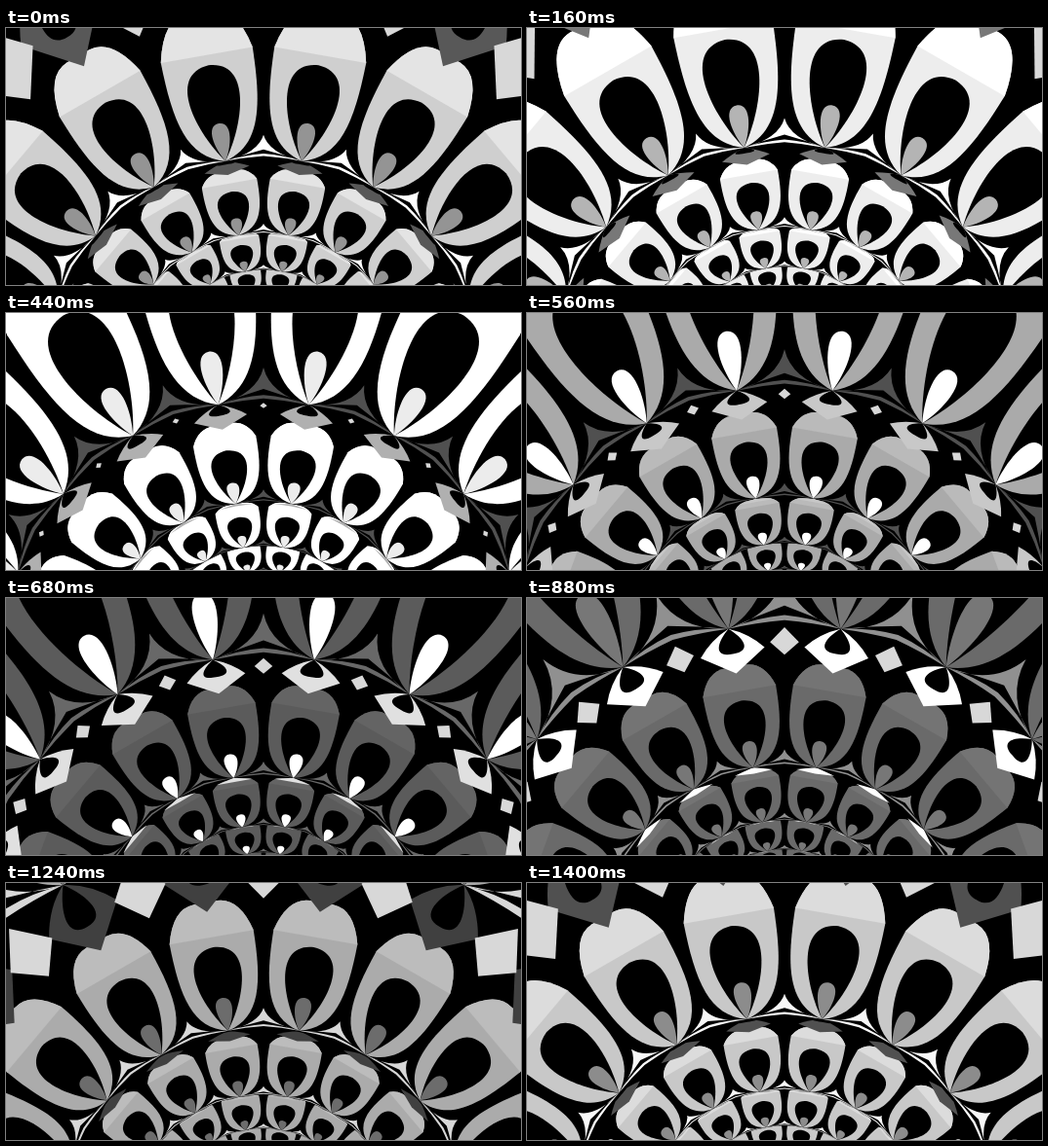
Write an HTML page with a canvas that moves like this. It is 528x264 px and loops after 1.44 s.

```html
<!DOCTYPE html>
<html lang="en">
<head>
<meta charset="utf-8">
<style>
  html, body { margin: 0; width: 100%; height: 100%; overflow: hidden; background: #000; }
  canvas { display: block; }
</style>
</head>
<body>
<canvas id="stage" width="528" height="264"></canvas>
<script>
const ctx = document.getElementById('stage').getContext('2d');
const LOOP = 1440, STEP = 40, CELLS = 18, FOCAL = 427, CAMERA = 2.9;
const RAD = Math.PI / 180;

let depth = 0, time = 0;

// Brightness climbs steadily from `low` at `start`, then falls back quickly.
function grey(low, start, scale = 1) {
  const FALL = 1080, FALL_TIME = 200;
  const age = (time - start + LOOP) % LOOP;
  const fallen = Math.min(1, Math.max(0, age - FALL) / FALL_TIME);
  const climb = 0.2 * Math.min(age, FALL) * (1 - fallen);
  const v = Math.min(255, Math.round((low + climb) * scale));
  return `rgb(${v},${v},${v})`;
}

// Perspective of a point given by angle, tube radius and depth offset.
function project([angle, radius, offset]) {
  const r = FOCAL * radius / Math.max(0.15, depth + offset);
  return [r * Math.sin(angle * RAD), -r * Math.cos(angle * RAD)];
}

function addSegment(points) {
  const xy = points.flatMap(project);
  const method = ['lineTo', 'quadraticCurveTo', 'bezierCurveTo'][points.length - 1];
  ctx[method](...xy);
}

// Fills a left half outline together with its mirror image.
function mirrored(fill, start, ...segments) {
  const back = [start, ...segments.flat()].reverse().map(([a, r, o]) => [-a, r, o]);
  ctx.beginPath();
  ctx.moveTo(...project(start));
  segments.forEach(addSegment);
  addSegment([back[0]]);
  let i = 1;
  for (const s of [...segments].reverse()) addSegment(back.slice(i, i += s.length));
  ctx.fillStyle = fill;
  ctx.fill();
}

function drop(fill, width, radius, offset) {
  const c = width / 0.75;
  mirrored(fill, [0, 1, 0],
    [[-c * 0.8, 1 + (radius - 1) * 0.4, offset * 0.4], [-c * 1.2, radius, offset], [0, radius, offset]]);
}

function drawSquare() {
  mirrored(grey(64, 1320), [0, 1, 0],
    [[-3.5, 1, 0.03], [-6.2, 1.048, 0.163]],
    [[0, 1.149, 0.433]]);
  drop('#000', 2.4, 1.15, 0.32);
}

function drawDiamond() {
  const half = 6.3 * (1.72 - depth);
  if (half <= 0) return;
  mirrored('#d8d8d8', [0, 1.41, 0.72], [[-half, 1.171, 0.308]], [[0, 1, 0.013]]);
}

function drawPetal() {
  const side = [-8.1, 1.19, -0.4];
  const top = [[-5.8, 1.16, -0.6], [-2, 1.149, -0.61]];
  mirrored(grey(100, 800, 0.91), [0, 1, 0],
    [[-9.3, 1, -0.1], [-9.6, 1.08, -0.24], side], top);
  mirrored(grey(100, 800), side, top);
  drop('#000', 5, 1.11, -0.44);
  drop(grey(76, 1080), 2, 1.03, -0.234);
}

function drawStar() {
  const fill = grey(80, 560), node = [-10, 1, 0];
  mirrored(fill, [0, 1, -0.07],
    [[-5, 1, -0.035], node],
    [[-1.4, 1, -0.04], [0, 1, -0.18]]);
  mirrored(fill, [0, 1, -0.015],
    [[-5, 1, -0.01], node],
    [[-5, 1, -0.03], [0, 1, -0.035]]);
}

function everyCell(draw, turn) {
  for (let i = 0; i < CELLS; i++) {
    ctx.save();
    ctx.rotate((i * 360 / CELLS + turn) * RAD);
    draw();
    ctx.restore();
  }
}

function render() {
  ctx.setTransform(1, 0, 0, 1, 0, 0);
  ctx.fillStyle = '#000';
  ctx.fillRect(0, 0, 528, 264);
  ctx.translate(264, 358);
  for (let ring = -4; ring <= 2; ring++) {
    depth = CAMERA - ring - time / LOOP;
    if (depth < 0.3) continue;
    everyCell(drawSquare, 10);
    everyCell(drawDiamond, 0);
    // Everything beyond this rim is hidden by the nearer ring.
    ctx.beginPath();
    ctx.rect(-600, -600, 1200, 1200);
    ctx.arc(0, 0, FOCAL / depth, 0, Math.PI * 2);
    ctx.fillStyle = '#000';
    ctx.fill('evenodd');
    everyCell(drawPetal, 10);
    everyCell(drawStar, 0);
  }
}

const began = performance.now();
function tick() {
  const elapsed = (performance.now() - began) % LOOP;
  time = Math.floor(elapsed / STEP) * STEP;
  render();
  requestAnimationFrame(tick);
}
tick();
</script>
</body>
</html>
```
